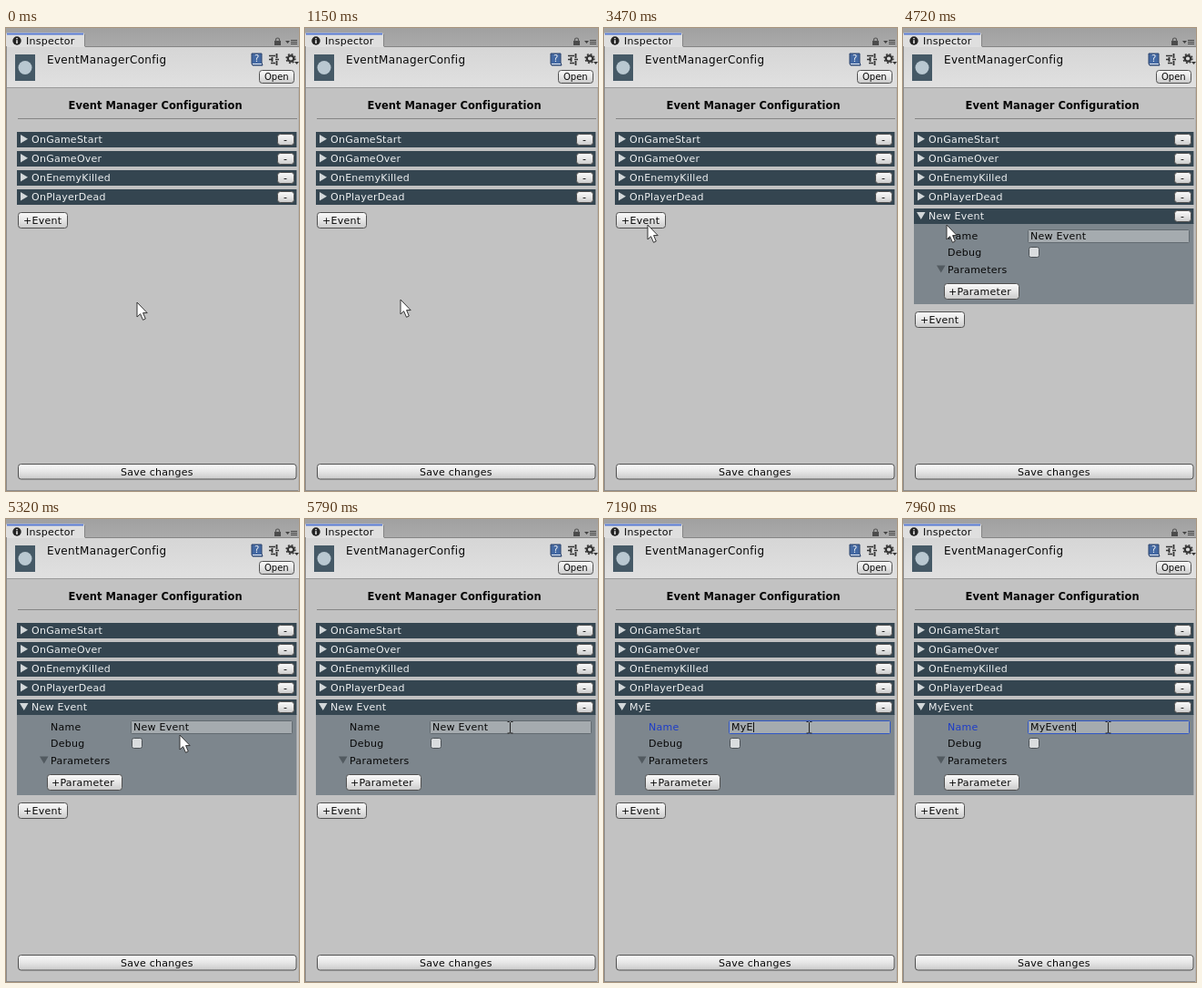
These frames come from a looping animation (322x508 px, 7990 ms). An HTML page:

```html
<!DOCTYPE html>
<html lang="en">
<head>
<meta charset="utf-8">
<title>Inspector</title>
<style>
  html, body { margin: 0; width: 100%; height: 100%; overflow: hidden; background: #c2c2c2; }
  svg { display: block; width: 100vw; height: 100vh; }
  text { font: 11px "DejaVu Sans", Verdana, sans-serif; letter-spacing: .25px; fill: #080808; white-space: pre; }
  .light { fill: #eef0f1; }
  .title { font-size: 11.5px; font-weight: bold; letter-spacing: .02px; }
  .asset { font-size: 12px; letter-spacing: .33px; }
  .small { font-size: 10px; letter-spacing: 0; }
</style>
</head>
<body>
<svg id="stage" viewBox="0 0 322 508" xmlns="http://www.w3.org/2000/svg">
  <defs>
    <linearGradient id="face" x2="0" y2="1">
      <stop stop-color="#fafafa"/><stop offset=".5" stop-color="#e6e6e6"/><stop offset="1" stop-color="#cacaca"/>
    </linearGradient>
    <linearGradient id="strip" x2="0" y2="1">
      <stop stop-color="#a0a0a0"/><stop offset="1" stop-color="#aaa"/>
    </linearGradient>
    <linearGradient id="header" x2="0" y2="1">
      <stop stop-color="#d6d6d6"/><stop offset="1" stop-color="#e0e0e0"/>
    </linearGradient>
  </defs>
  <g id="chrome">
    <rect width="322" height="508" fill="#c2c2c2"/>
    <rect width="322" height="20" fill="url(#strip)"/>
    <path d="M0 21V7Q0 5 2 5H84Q86 5 86 8V21Z" fill="#dfdfdf"/>
    <path d="M1 6.5H85" stroke="#587ad2" stroke-width="2"/>
    <path d="M86.5 7V20M87 20.5H322" stroke="#858585"/>
    <circle cx="12" cy="14" r="4.7" fill="#222"/>
    <path d="M12 11V12.2M12 13.2V17" stroke="#eee" stroke-width="1.5"/>
    <rect x="295" y="14" width="7" height="5" fill="#4b4b4b"/>
    <path d="M296.5 15V13Q296.5 11 298.5 11Q300.5 11 300.5 13V15" fill="none" stroke="#555" stroke-width="1.2"/>
    <path d="M307 14H312L309.5 17ZM313 13H320V14H313ZM313 15H320V16H313ZM313 17H320V18H313Z" fill="#444"/>
    <rect y="21" width="322" height="44" fill="url(#header)"/>
    <path d="M0 65.5H322" stroke="#9a9a9a"/>
    <rect x="10" y="29" width="22" height="29" fill="#455966"/>
    <circle cx="21" cy="43.5" r="7.5" fill="#b9c8d1"/>
    <path d="M270 28H281V38L282 41H271L270 39Z" fill="#4469a3" stroke="#2b426b" stroke-linejoin="round"/>
    <path d="M271 39.5H281" stroke="#e8edf5"/>
    <text x="273" y="37" class="small light" font-weight="bold">?</text>
    <path d="M289 30.5H296M289 34.5H293M296 34.5H300M291 38.5H296" stroke="#333" stroke-width="1.4"/>
    <path d="M297.5 28V33M292.5 32V37M297.5 36V41" stroke="#333" stroke-width="1.8"/>
    <circle cx="313" cy="33.5" r="3.2" fill="none" stroke="#333" stroke-width="2.2"/>
    <circle cx="313" cy="33.5" r="4.9" fill="none" stroke="#333" stroke-width="1.5" stroke-dasharray="1.9 1.95"/>
    <path d="M317 37H322L319.5 40Z" fill="#333"/>
    <path d="M13 99.5H320" stroke="#858585"/>
    <path d="M.5 20V508M0 507.5H322" stroke="#8b8b8b"/>
    <path d="M321.5 66V508" stroke="#b2b2b2"/>
  </g>
  <g id="panel">
    <rect x="12" y="214" width="307.4" height="89" fill="#7d868d"/>
    <rect id="field" x="137.5" y="221.5" width="177" height="14" rx="1" fill="#a5abaf"/>
    <rect id="selection" x="140" y="222.5" width="61" height="12" fill="#527cc5"/>
    <rect x="138.5" y="240.5" width="11" height="11" rx="2" fill="#d9dcde" stroke="#4b5156"/>
    <path d="M37 260.5H46.5L41.8 268.5Z" fill="#525a60"/>
  </g>
  <g id="addEvent"></g>
  <path id="arrow" d="M0 0V16L3.6 12.7L6.5 19.3L9.3 18L6.6 11.6H11.2Z" fill="#fff" stroke="#333" stroke-linejoin="round"/>
  <path id="beam" d="M-3 -6.5H-1L0 -5.5L1 -6.5H3M0 -5.5V5M-3 6H-1L0 5L1 6H3" fill="none" stroke="#222"/>
  <path id="caret" d="M0 223V234" stroke="#111"/>
</svg>
<script>
const LOOP = 7990;
const PRESS = 3720, ADD = 3840, FOCUS = 5900;
const TYPED = "MyEvent";
const KEY_TIMES = [6800, 6970, 7180, 7380, 7580, 7770, 7910];

// Pointer stops: time, x, y
const PATH = [
  [50, 144, 301], [400, 128, 300], [770, 105, 298], [1400, 105, 298],
  [1700, 93, 284], [1950, 71, 253], [2170, 56, 228], [2450, 50, 219],
  [2720, 48, 216], [4720, 48, 216], [4850, 66, 222], [5100, 160, 236],
  [5270, 189, 237], [5320, 191, 237], [5480, 210, 232], [5700, 226, 229]
];

const $ = id => document.getElementById(id);

function add(parent, tag, attrs, content = "") {
  const node = document.createElementNS("http://www.w3.org/2000/svg", tag);
  for (const name in attrs) node.setAttribute(name, attrs[name]);
  node.textContent = content;
  parent.append(node);
  return node;
}

const label = (parent, x, y, content, cls = "") =>
  add(parent, "text", { x, y, class: cls }, content);

function button(parent, x, y, w, h, content, textX, baseline, cls) {
  const face = add(parent, "rect", {
    x: x + .5, y: y + .5, width: w - 1, height: h - 1, rx: 3, fill: "url(#face)", stroke: "#505050"
  });
  label(parent, textX, baseline, content, cls);
  return face;
}

function eventRow(parent, y, name, open) {
  add(parent, "rect", { x: 12, y, width: 307.4, height: 17, fill: "#344550" });
  const d = open ? `M15 ${y + 4}H24.5L19.8 ${y + 12}Z` : `M16 ${y + 3}V${y + 12.5}L24 ${y + 7.8}Z`;
  add(parent, "path", { d, fill: "#d3d8da" });
  button(parent, 298, y + 2, 19, 13, "-", 305, y + 12);
  return label(parent, 28, y + 12, name, "light");
}

const chrome = $("chrome"), panel = $("panel");
label(chrome, 22, 18, "Inspector");
label(chrome, 45, 39, "EventManagerConfig", "asset");
button(chrome, 278, 46, 39, 15, "Open", 284, 57, "small");
label(chrome, 68.5, 89, "Event Manager Configuration", "title");
["OnGameStart", "OnGameOver", "OnEnemyKilled", "OnPlayerDead"]
  .forEach((name, i) => eventRow(chrome, 114 + 21 * i, name, false));
button(chrome, 13, 478, 306.5, 17.5, "Save changes", 126, 490.5);

const heading = eventRow(panel, 198, "New Event", true);
const nameLabel = label(panel, 49, 232, "Name");
const nameValue = label(panel, 140, 232, "New Event");
label(panel, 49, 250, "Debug");
label(panel, 49, 269, "Parameters");
button(panel, 45, 280, 83, 18, "+Parameter", 50, 293);
const eventButton = button($("addEvent"), 13, 202, 55, 18, "+Event", 19, 215);

const show = (node, on) => node.setAttribute("visibility", on ? "visible" : "hidden");
const move = (node, x, y) => node.setAttribute("transform", `translate(${x} ${y})`);

function pointerAt(t) {
  const next = PATH.findIndex(stop => stop[0] > t);
  if (next === 0) return PATH[0].slice(1);
  if (next < 0) return PATH[PATH.length - 1].slice(1);
  const [t0, x0, y0] = PATH[next - 1], [t1, x1, y1] = PATH[next];
  const u = (t - t0) / (t1 - t0);
  return [Math.round(x0 + (x1 - x0) * u), Math.round(y0 + (y1 - y0) * u)];
}

function render(t) {
  const added = t >= ADD, focused = t >= FOCUS;
  const count = KEY_TIMES.filter(time => t >= time).length;
  const name = count ? TYPED.slice(0, count) : "New Event";
  panel.setAttribute("display", added ? "inline" : "none");
  move($("addEvent"), 0, added ? 109 : 0);
  eventButton.setAttribute("fill", t >= PRESS && !added ? "#a9a9a9" : "url(#face)");

  heading.textContent = nameValue.textContent = name;
  nameLabel.style.fill = focused ? "#1d3cc8" : "";
  $("field").setAttribute("stroke", focused ? "#3157c5" : "#626a70");
  $("selection").setAttribute("display", focused && !count ? "inline" : "none");
  show($("caret"), count > 0);
  if (count) move($("caret"), Math.round(140 + nameValue.getComputedTextLength()) + .5, 0);

  const [x, y] = pointerAt(t);
  const overField = added && x > 137 && y > 221 && y < 236;
  show($("arrow"), !overField);
  show($("beam"), overField);
  move($("arrow"), x, y);
  move($("beam"), x - .5, y);
}

const start = performance.now();
function tick() {
  render((performance.now() - start) % LOOP);
  requestAnimationFrame(tick);
}
tick();
</script>
</body>
</html>
```
